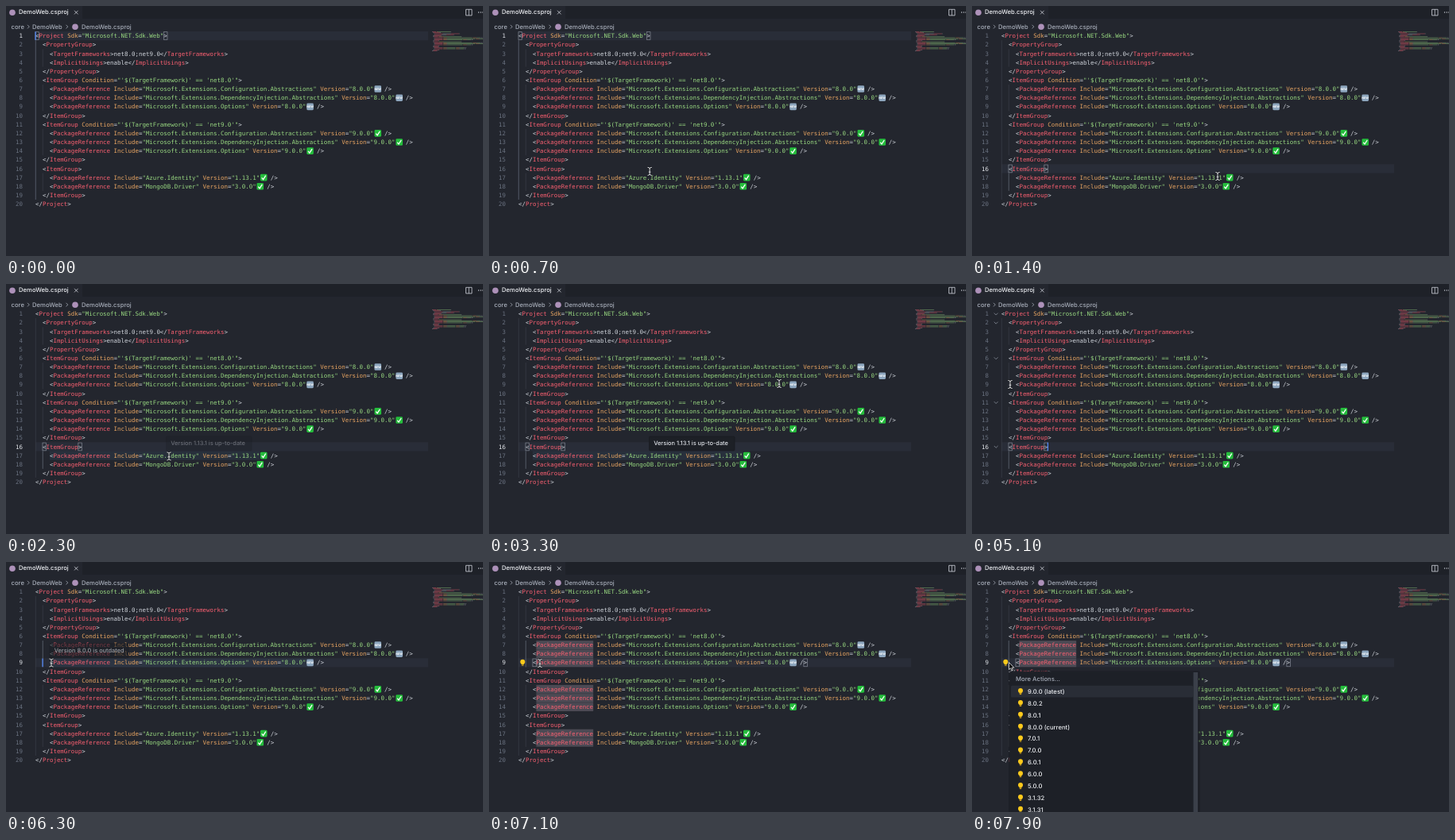
An HTML page for the animation above (8 s loop, 600x315 px).

```html
<!DOCTYPE html>
<html lang="en">
<head>
<meta charset="utf-8">
<title>Package versions in an editor</title>
<style>
html, body { margin: 0; width: 100%; height: 100%; overflow: hidden; background: #23262e; }
svg { display: block; width: 600px; height: 315px; }
text { white-space: pre; text-rendering: geometricPrecision; }
.ui { font: 500 7.7px Inter, "Open Sans", sans-serif; }
.code { font: 7.452px "DejaVu Sans Mono", monospace; }
</style>
</head>
<body>
<svg id="stage" viewBox="0 0 600 315"></svg>
<script>
const CYCLE = 8000, LEFT = 37, COL = 4.486, ROW = 11.158;
const color = {
  bg: '#23262e', bar: '#1e2128', plain: '#cfd3da', tag: '#f75f70',
  attr: '#e8a562', string: '#98d880', muted: '#a6acb8', caret: '#528bff'
};
const stage = document.getElementById('stage');
const colX = col => LEFT + col * COL;
const rowY = row => 37.6 + (row - 1) * ROW;

function el(tag, attrs = {}, parent = stage, content = '') {
  const node = document.createElementNS('http://www.w3.org/2000/svg', tag);
  for (const key in attrs) node.setAttribute(key, attrs[key]);
  node.textContent = content;
  parent.appendChild(node);
  return node;
}
const group = (parent = stage) => el('g', {}, parent);
const rect = (x, y, width, height, fill, parent, more = {}) =>
  el('rect', { x, y, width, height, fill, ...more }, parent);
const path = (d, stroke, parent, more = {}) =>
  el('path', { d, stroke, fill: 'none', ...more }, parent);
const label = (x, y, content, fill, parent, more = {}) =>
  el('text', { x, y: y + 2.75, fill, class: 'ui', ...more }, parent, content);
const show = (node, on) => node.setAttribute('visibility', on ? 'inherit' : 'hidden');

// "~" marks an outdated version, "^" a current one.
const reference = (name, version, mark) =>
  `    <PackageReference Include="${name}" Version="${version}"${mark} />`;
const itemGroup = (framework, version, mark) => [
  `  <ItemGroup Condition="'$(TargetFramework)' == '${framework}'">`,
  ...['Configuration.Abstractions', 'DependencyInjection.Abstractions', 'Options']
    .map(name => reference('Microsoft.Extensions.' + name, version, mark)),
  '  </ItemGroup>'
];
const lines = [
  '<Project Sdk="Microsoft.NET.Sdk.Web">',
  '  <PropertyGroup>',
  '    <TargetFrameworks>net8.0;net9.0</TargetFrameworks>',
  '    <ImplicitUsings>enable</ImplicitUsings>',
  '  </PropertyGroup>',
  ...itemGroup('net8.0', '8.0.0', '~'),
  ...itemGroup('net9.0', '9.0.0', '^'),
  '  <ItemGroup>',
  reference('Azure.Identity', '1.13.1', '^'),
  reference('MongoDB.Driver', '3.0.0', '^'),
  '  </ItemGroup>',
  '</Project>'
];

function tokens(line) {
  const pattern = /("[^"]*")|(?<=<\/?)(\w+)|(\w+)(?==)|(.)/g;
  return [...line.matchAll(pattern)].map(m => ({
    text: m[0], col: m.index,
    fill: m[1] ? color.string : m[2] ? color.tag : m[3] ? color.attr : color.plain
  }));
}

function badge(x, y, current, parent) {
  rect(x + .3, y - 4.3, 8.6, 8.6, current ? '#25bd3c' : '#8da6be', parent, { rx: 1.4 });
  if (current) {
    path(`M${x + 2.1} ${y + .3}l1.8 2.2 3.2-5`, '#fff', parent, { 'stroke-width': 1.3 });
  } else {
    el('text', { x: x + 4.6, y: y + 1.3, fill: '#fff', 'font-size': 3.6, 'font-weight': 700,
      'font-family': 'Inter, sans-serif', 'text-anchor': 'middle' }, parent, 'NEW');
  }
}

function bulb(x, y, parent) {
  el('circle', { cx: x, cy: y - 1.2, r: 3, fill: '#ffca1c' }, parent);
  rect(x - 1.5, y + 1, 3, 1.4, '#ffca1c', parent);
  rect(x - 1.2, y + 2.8, 2.4, 1.1, '#d5a319', parent);
}

function tooltip(x, y, width, content) {
  const g = group();
  rect(x, y, width, 18, '#1d2026', g, { stroke: '#191b20', 'stroke-width': .7, rx: 1.5 });
  label(x + 5.7, y + 8.7, content, '#dfe2e8', g, { style: 'font-size:7.4px' });
  return g;
}

// Backgrounds and highlights
rect(0, 0, 600, 315, color.bg);
const lineBand = rect(LEFT, 0, 494, ROW, '#292d38');
const hoverBand = rect(0, 0, 0, ROW, '#3a4d63', stage, { opacity: .25 });
const words = group();
lines.forEach((line, i) => {
  if (line.includes('PackageReference'))
    rect(colX(5), rowY(i + 1) - 5.4, 16 * COL, 10.8, '#4c4a54', words);
});

// Indent guides
const guide = (col, first, last, stroke, parent) =>
  path(`M${colX(col) + .3} ${rowY(first) - ROW / 2}V${rowY(last) + ROW / 2}`, stroke, parent,
    { 'stroke-width': .7 });
guide(0, 2, 19, '#3b4048');
const blocks = [[3, 4], [7, 9], [12, 14], [17, 18]];
blocks.forEach(([a, b]) => guide(2, a, b, '#3b4048'));
const activeGuides = { 1: guide(0, 2, 19, '#5c6473'), 16: guide(2, 17, 18, '#5c6473'),
  9: guide(2, 7, 9, '#5c6473') };

// Code, line numbers and minimap
const numbers = lines.map((line, i) => {
  const y = rowY(i + 1);
  const text = el('text', { x: LEFT, y: y + 2.6, class: 'code' });
  for (const token of tokens(line)) {
    const isBadge = '~^'.includes(token.text);
    if (isBadge) badge(colX(token.col), y, token.text === '^');
    el('tspan', { fill: token.fill }, text, isBadge ? '  ' : token.text);
    if (token.text.trim())
      rect(536 + token.col * .64, 32 + i * 1.27, token.text.length * .64, .8, token.fill,
        stage, { opacity: .48 });
  }
  return el('text', { x: 21, y: y + 2.6, class: 'code', 'text-anchor': 'end' }, stage, i + 1);
});

const folds = group();
[1, 2, 6, 11, 16].forEach(row =>
  path(`M27.8 ${rowY(row) - 1}l2.4 2.4 2.4-2.4`, '#8b929e', folds, { 'stroke-width': .8 }));

// Tabs and breadcrumbs
rect(0, 0, 600, 16, color.bar);
rect(0, 0, 96, 16.5, color.bg);
const icon = (cx, cy) => el('circle', { cx, cy, r: 3.8, fill: '#ad91b9' });
icon(8, 8.2);
label(16, 7.7, 'DemoWeb.csproj', '#eceef2');
path('M86 5.8l4.6 4.6m0-4.6l-4.6 4.6', '#d0d4db', stage, { 'stroke-width': .8 });
path('M578.5 4.3h7.5v7.6h-7.5zM582.2 4.3v7.6', '#d0d4db', stage, { 'stroke-width': .8 });
[594.5, 597.2, 599.9].forEach(cx => el('circle', { cx, cy: 8, r: .7, fill: '#d0d4db' }));
label(6.5, 25.8, 'core', color.muted);
label(33, 25.8, 'DemoWeb', color.muted);
label(95, 25.8, 'DemoWeb.csproj', color.muted);
[27, 75.5].forEach(x => path(`M${x} 23.8l2.3 2.3-2.3 2.3`, color.muted, stage, { 'stroke-width': .8 }));
icon(87, 26.3);

// Caret, bracket pairs, popups
const boxes = [0, 1].map(() => rect(0, 0, COL, 9.8, 'none', stage,
  { stroke: '#8a909b', 'stroke-width': .65 }));
const caret = rect(0, 0, 1.2, 10.6, color.caret);
const actionBulb = group();
bulb(42.3, rowY(9), actionBulb);
const tipCurrent = tooltip(201.5, 192, 107.5, 'Version 1.13.1 is up-to-date');
const tipOutdated = tooltip(55, 102.8, 99, 'Version 8.0.0 is outdated');

const menu = group();
rect(46, 137, 241, 190, '#14161a', menu, { opacity: .35, rx: 3 });
rect(47.3, 138.2, 237, 190, '#1d2027', menu, { stroke: '#20232a', 'stroke-width': .7, rx: 2.5 });
label(55, 147.3, 'More Actions...', color.muted, menu);
rect(49, 155.8, 229, 14.6, '#292d36', menu, { rx: 1.5 });
['9.0.0 (latest)', '8.0.2', '8.0.1', '8.0.0 (current)', '7.0.1', '7.0.0', '6.0.1', '6.0.0',
  '5.0.0', '3.1.32', '3.1.31'].forEach((version, i) => {
  const y = 163.2 + i * 14.88;
  bulb(61, y, menu);
  label(70, y, version, '#eceef2', menu);
});
rect(278.5, 139, 5.5, 180, '#3b404a', menu);

// Pointers
const beam = group();
const beamPath = 'M-2.6-5Q0-5 0-3.4Q0-5 2.6-5M0-3.4V3.4M-2.6 5Q0 5 0 3.4Q0 5 2.6 5M-1.3 .8H1.3';
path(beamPath, '#15171b', beam, { 'stroke-width': 2.4 });
path(beamPath, '#e3e5e8', beam, { 'stroke-width': 1 });
const arrow = el('path', { d: 'M0 0V9L2.1 7.2 3.5 10.4 5 9.8 3.6 6.7H6.4Z', fill: '#08090a',
  stroke: '#f2f2f2', 'stroke-width': .8 });

// [time, x, y]
const route = [
  [400, 240, 250], [750, 200, 206], [1400, 309, 214.5], [1850, 205, 217], [2900, 205, 217],
  [3300, 365, 125.5], [4300, 365, 125.5], [5000, 48, 126.5], [5500, 48, 126.5],
  [5900, 57, 127], [6500, 57, 127], [6750, 64, 127.5], [7150, 64, 127.5], [7400, 46.5, 126.5]
];
// Caret placement after each click, with the columns of the matching brackets.
const clicks = [
  { at: 0, row: 1, col: 0, pair: [0, 36] },
  { at: 750, row: 16, col: 13, pair: [2, 12] },
  { at: 5300, row: 9, col: 2 },
  { at: 6600, row: 9, col: 5, pair: [4, 80] }
];

const clamp = v => Math.max(0, Math.min(1, v));
function pointerAt(t) {
  let i = 0;
  while (i < route.length - 2 && t >= route[i + 1][0]) i++;
  const [t0, x0, y0] = route[i], [t1, x1, y1] = route[i + 1];
  const p = clamp((t - t0) / (t1 - t0)), k = p * p * (3 - 2 * p);
  return [x0 + (x1 - x0) * k, y0 + (y1 - y0) * k];
}

function render(t) {
  const click = clicks.filter(c => c.at <= t).pop();
  const menuOpen = t >= 7600;
  const y = rowY(click.row);
  lineBand.setAttribute('y', y - ROW / 2);
  numbers.forEach((n, i) => n.setAttribute('fill', i + 1 === click.row ? '#e4e7ec' : '#6a7280'));
  for (const row in activeGuides) show(activeGuides[row], +row === click.row);
  boxes.forEach((box, i) => {
    show(box, click.pair);
    if (!click.pair) return;
    box.setAttribute('x', colX(click.pair[i]));
    box.setAttribute('y', y - 4.9);
  });
  caret.setAttribute('x', colX(click.col) - .5);
  caret.setAttribute('y', y - 5.3);
  show(caret, !menuOpen && Math.floor((t - click.at) / 500) % 2 === 0);

  const first = t >= 2250 && t < 3500, second = t >= 6210 && t < 6600;
  tipCurrent.setAttribute('opacity', first ? clamp((t - 2250) / 150) : 0);
  tipOutdated.setAttribute('opacity', second ? clamp((t - 6210) / 150) : 0);
  show(hoverBand, first || second);
  hoverBand.setAttribute('x', colX(4));
  hoverBand.setAttribute('y', rowY(second ? 9 : 17) - ROW / 2);
  hoverBand.setAttribute('width', (second ? 74 : 59) * COL);

  folds.setAttribute('opacity', clamp((t - 4800) / 200) * clamp((6000 - t) / 300));
  show(words, t >= 6800);
  show(actionBulb, t >= 6900);
  show(menu, menuOpen);
  const [px, py] = pointerAt(t), overBulb = t >= 7300;
  show(beam, t >= 400 && !overBulb);
  show(arrow, overBulb);
  (overBulb ? arrow : beam).setAttribute('transform', `translate(${px} ${py})`);
}

const start = performance.now();
function tick() {
  render((performance.now() - start) % CYCLE);
  requestAnimationFrame(tick);
}
tick();
</script>
</body>
</html>
```
